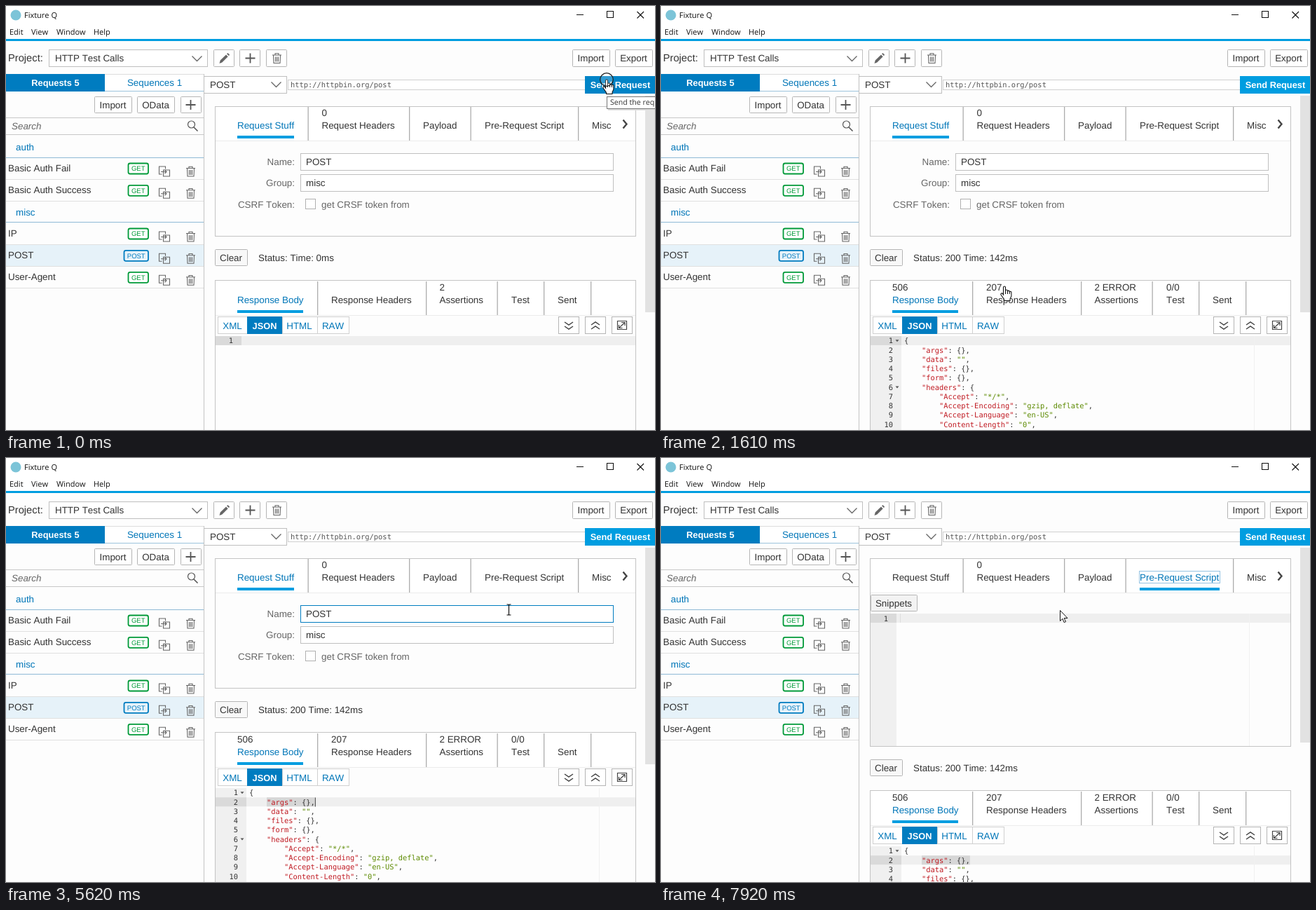
Write an HTML page that moves like this. It is 926x605 px and loops after 8000 ms.

```html
<!DOCTYPE html>
<html lang="en">
<head>
<meta charset="utf-8">
<title>HTTP request tester</title>
<style>
html, body { margin: 0; width: 100%; height: 100%; overflow: hidden; background: #fdfdfd; }
svg { display: block; width: 926px; height: 605px; }
text { font-family: "Liberation Sans", Arial, sans-serif; font-size: 13.4px; font-kerning: none; fill: #333; text-rendering: geometricPrecision; }
.ui { font-family: "Open Sans", sans-serif; font-size: 11px; fill: #111; }
.mono { font-family: "DejaVu Sans Mono", monospace; font-size: 10.4px; }
.b { font-weight: bold; font-size: 12.8px; }
.w { fill: #fff; }
.blue { fill: #0076b8; }
.grey { fill: #666; }
.end { text-anchor: end; }
.mid { text-anchor: middle; }
.key { fill: #c01a22; }
.str { fill: #5c8a00; }
</style>
</head>
<body>
<svg id="stage" viewBox="0 0 926 605"></svg>
<script>
const LOOP = 8000, LINE = 13.25, CHAR = 6.26;
const $ = id => document.getElementById(id);

// Drawing helpers
const text = (x, y, s, cls = '', more = '') => `<text x="${x}" y="${y}" class="${cls}" ${more}>${s}</text>`;
const rect = (x, y, w, h, fill, more = '') => `<rect x="${x}" y="${y}" width="${w}" height="${h}" fill="${fill}" ${more}/>`;
const frame = (x, y, w, h, stroke = '#bfbfbf', fill = '#fff', more = '') =>
  rect(x + .5, y + .5, w, h, fill, `stroke="${stroke}" ${more}`);
const path = (d, stroke = '#555', width = 1.2, more = '') =>
  `<path d="${d}" fill="none" stroke="${stroke}" stroke-width="${width}" ${more}/>`;
const group = (id, body, more = '') => `<g id="${id}" ${more}>${body}</g>`;
const hline = (x, y, w, color = '#dcdcdc') => rect(x, y, w, 1, color);
const button = (x, y, w, h, label = '', fill = '#fff') =>
  frame(x, y, w, h, '#b5b5b5', fill, 'rx="1"') + text(x + w / 2, y + 17, label, 'mid');
const chevron = (x, y) => path(`M${x} ${y}l7 7 7-7`, '#666', 1.3);
const plus = (x, y) => path(`M${x - 7} ${y}h14M${x} ${y - 7}v14`, '#555', 1.8);
const trash = (x, y) =>
  path('M0 3h13M4 3V.7h5V3M1.5 3l.5 11.5h9L11.500 3M4.500 5.500v7M6.500 5.500v7M8.500 5.500v7', '#666', 1.1,
    `transform="translate(${x} ${y})"`);
const copy = (x, y) =>
  path('M4.500 11.500H.5V.5h9V4M6.500 5.500h9v9h-9zM3 8h8M8.500 5.500L11 8l-2.500 2.500', '#666', 1.1,
    `transform="translate(${x} ${y})"`);

function windowBar() {
  const menu = [[5, 'Edit'], [36, 'View'], [72, 'Window'], [125, 'Help']];
  return rect(0, 0, 926, 47, '#fff') +
    '<circle cx="14" cy="13" r="7.500" fill="#7cc4d8"/>' +
    text(26, 17, 'Fixture Q', 'ui') + menu.map(m => text(m[0], 41, m[1], 'ui')).join('') +
    path('M814 12.500h10M857.500 7.500h9v9h-9zM900.500 8l9.500 9.500M910 8l-9.500 9.500', '#111', 1.1) +
    rect(0, 47, 926, 3, '#009de0');
}

function toolbar() {
  return text(3, 79, 'Project:', '', 'style="font-size:14.700px"') +
    frame(61, 62, 226, 24) + text(70, 79, 'HTTP Test Calls') + chevron(265.5, 71.5) +
    button(296, 62, 29, 24) + button(333, 62, 29, 24) + button(371, 62, 29, 24) +
    '<path d="M304.500 82l1.200-4.500 8.300-8 2.700 2.700-8.300 8.300zM315 68.300l1.500-1.300 2.700 2.700-1.400 1.400z" fill="#666"/>' +
    plus(348.5, 74.5) + trash(380, 67) +
    button(808, 62, 53, 24, 'Import') + button(869, 62, 53, 24, 'Export');
}

function listRow(name, y, verb) {
  const post = verb === 'POST', x = post ? 168.5 : 174.5, color = post ? '#007cc0' : '#009a38';
  return text(3, y, name) +
    rect(x, y - 11.5, 203 - x, 15, post ? '#e6f2f9' : '#fff', `stroke="${color}" stroke-width="1.800" rx="2.500"`) +
    text((x + 203) / 2, y - .6, verb, 'mid', `style="font-size:9.500px;fill:${color}"`) +
    copy(218, y - 7.5) + trash(257, y - 7.5) + hline(0, Math.round(y + 11), 282, '#e0e0e0');
}

function sidebar() {
  const groupRow = (name, y, lineY) => text(14, y, name, 'blue') + hline(0, lineY, 282, '#8fbad6');
  return rect(141, 97, 141, 25, '#fff') + hline(141, 97, 141) + hline(0, 121, 282, '#9cc3dc') +
    rect(0, 97, 141, 25, '#007cc0') + text(70.5, 114, 'Requests 5', 'b w mid') +
    text(212, 114, 'Sequences 1', 'blue mid') +
    button(126, 129, 53, 23, 'Import') + button(187, 129, 53, 23, 'OData') + button(249, 129, 29, 23) +
    plus(263.5, 141) +
    hline(0, 159, 282, '#c8c8c8') + hline(0, 183, 282, '#c8c8c8') + text(8, 176, 'Search', 'grey', 'font-style="italic"') +
    '<circle cx="264.500" cy="169" r="5" fill="none" stroke="#555" stroke-width="1.200"/>' + path('M268 173l5.500 5.500', '#555', 1.6) +
    groupRow('auth', 206, 216) + listRow('Basic Auth Fail', 236, 'GET') + listRow('Basic Auth Success', 267.3, 'GET') +
    groupRow('misc', 299, 308) + rect(0, 340, 282, 31, '#e6f2f9') +
    listRow('IP', 329, 'GET') + listRow('POST', 360.3, 'POST') + listRow('User-Agent', 391.3, 'GET') +
    rect(282, 97, 1, 508, '#c4c4c4');
}

function urlBar() {
  return frame(402, 105, 425, 14, '#d0d0d0') + text(406, 116, 'http://httpbin.org/post', 'mono', 'style="fill:#555"') +
    frame(282, 100, 118, 24) + text(291, 117, 'POST') + chevron(378.5, 108.5) +
    rect(826, 100, 100, 25, '#009de0', 'id="send"') + text(876.5, 117, 'Send Request', 'b w mid') +
    rect(912, 128, 14, 309, '#e2e2e2', 'id="thumb"');
}

const tabs = (y, list, splits) => hline(299, y + 48, 599, '#ececec') +
  list.map(([x, name, id = '', cls = '']) => text(x, y + 31, name, cls, id && `id="${id}"`)).join('') +
  splits.map(x => rect(x, y, 1.3, 48, '#adadad')).join('');

function requestPanel() {
  const field = (y, label, value, id) => text(412, y + 17, label, 'grey end') +
    frame(420, y, 446, 24, '#bfbfbf', '#fff', id ? `id="${id}"` : '') + text(428, y + 17, value);
  return frame(298, 143, 600, 185, '#c4c4c4', '#fdfdfd', 'id="box"') +
    rect(299, 144, 599, 48, '#fff') +
    tabs(144, [[330, 'Request Stuff', 'tabA', 'blue'], [450.5, 'Request Headers'], [595, 'Payload'],
      [683, 'Pre-Request Script', 'tabB'], [836, 'Misc']], [430.5, 575, 662.5, 816]) +
    text(450.5, 157, '0') + path('M880.500 162.500l5 6-5 6', '#444', 2.4) +
    rect(330, 185, 81, 4, '#009de0', 'id="bar"') +
    rect(682.5, 161.5, 115, 17, 'none', 'id="focus" stroke="#2a86c4" stroke-dasharray="1 1"') +
    group('form',
      field(210, 'Name:', 'POST', 'name') + field(240, 'Group:', 'misc') +
      text(412, 287.5, 'CSRF Token:', 'grey end') + frame(427, 275, 14, 14, '#b0b0b0') +
      text(450, 287.5, 'get CRSF token from', 'grey')) +
    group('script',
      button(299, 195, 66, 23, 'Snippets', '#f3f3f3') + rect(299, 222, 37, 189, '#f0f0f0') +
      rect(299, 222, 37, 13, '#dadada') + rect(336, 222, 562, 13, '#efefef') +
      rect(839, 222, 1, 189, '#f2f2f2') + rect(341, 222, 1, 13, '#ddd') + text(324, 232.5, '1', 'mono end'));
}

const body = ['{', '    "args": {},', '    "data": "",', '    "files": {},', '    "form": {},', '    "headers": {',
  '        "Accept": "*/*",', '        "Accept-Encoding": "gzip, deflate",',
  '        "Accept-Language": "en-US",', '        "Content-Length": "0",'];

function codeLine(src, i) {
  const y = 481.3 + LINE * i, code = src.trimStart();
  const marked = code.replace(/"[^"]*"(:?)/g, (s, colon) =>
    `<tspan class="${colon ? 'key' : 'str'}">${colon ? s.slice(0, -1) : s}</tspan>${colon}`);
  const fold = code.endsWith('{') ? `<path d="M334.500 ${y - 5}h5l-2.500 3z" fill="#555"/>` : '';
  return text(331, y, i + 1, 'mono end') + fold + text(347 + CHAR * (src.length - code.length), y, marked, 'mono');
}

function responsePanel() {
  const counts = [[330, '506'], [464, '207'], [618.5, '2 ERROR'], [721, '0/0']];
  const formats = [[323, 'XML'], [418.5, 'HTML'], [466.5, 'RAW']];
  const tool = (x, d, w = 1.5) => frame(x, 443, 29, 24, '#b5b5b5') + path(d, '#444', w);
  return button(298, 347, 46, 23, 'Clear', '#f8f8f8') + text(360, 364, '', '', 'id="status"') +
    frame(298, 391, 600, 400, '#c4c4c4', '#fdfdfd') + rect(299, 392, 599, 49, '#fff') +
    tabs(393, [[330, 'Response Body', '', 'blue'], [464, 'Response Headers'], [618.5, 'Assertions'],
      [721, 'Test'], [787, 'Sent']], [444, 599, 700.5, 767, 834]) +
    rect(330, 434, 94, 4, '#009de0') +
    group('before', text(618.5, 406, '2')) +
    group('counts', counts.map(c => text(c[0], 406, c[1])).join('')) +
    frame(302, 443, 187, 24, '#d0d0d0') + rect(394, 443, 1, 25, '#d0d0d0') + rect(444, 443, 1, 25, '#d0d0d0') +
    rect(344, 443, 50, 25, '#007cc0') + text(369, 460.5, 'JSON', 'b w mid') +
    formats.map(f => text(f[0], 460.5, f[1], 'blue mid')).join('') +
    tool(788, 'M797 451l6 4 6-4M797 457l6 4 6-4') + tool(826, 'M835 455l6-4 6 4M835 461l6-4 6 4') +
    tool(864, 'M872.500 449.500h13v12h-13zM875 459l7.500-7M878 451.500h5v4.500M874.500 455v4.500h5', 1.2) +
    rect(299, 471, 44, 140, '#f0f0f0', 'id="gutter"') +
    group('active', rect(299, 471, 599, 13, '#efefef') + rect(299, 471, 37, 13, '#dadada', 'id="activeGutter"')) +
    group('empty', text(324, 481.3, '1', 'mono end')) +
    group('json', rect(846, 471, 1, 134, '#f0f0f0') + rect(372, 484.3, 0, 13, '#d6d6d6', 'id="selection"') +
      body.map(codeLine).join('') + rect(441, 484.5, 1, 13, '#444', 'id="caret"'));
}

const tooltip = () => rect(859, 132, 70, 17, '#ddd') + frame(857, 129, 90, 17, '#777') +
  text(862, 141, 'Send the request', 'ui', 'style="font-size:10.600px;fill:#333"');

const pointers = () =>
  group('hand', '<path d="M-1.500 12V1.500a1.500 1.500 0 0 1 3 0V6.500a1.500 1.500 0 0 1 3 0V7.500a1.400 1.400 0 0 1 2.800 0V8.500a1.300 1.300 0 0 1 2.600 0V14l-1.900 4v2.500H-.5V18.500L-5 12a1.500 1.500 0 0 1 2-2z" fill="#fff" stroke="#111" stroke-width="1.100"/>' +
    path('M1.500 6v5M4.500 7v4M7.300 8v3', '#111', 1)) +
  group('beam', path('M-3-7.500h2.200L0-6.800l.8-.7H3M0-7V7M-3 7.500h2.200L0 6.800l.8.7H3', '#111', 1.2)) +
  group('arrow', '<path d="M.5.5V15.500l3.400-3.200 2.300 5.300 2.300-1-2.300-5.100h4.800z" fill="#fff" stroke="#111"/>') +
  '<circle id="press" r="9.300" fill="#fff" fill-opacity=".2" stroke="#222" stroke-width="1.300"/>';

$('stage').innerHTML = rect(0, 0, 926, 605, '#fdfdfd') + windowBar() + toolbar() + sidebar() + urlBar() +
  requestPanel() + group('response', responsePanel()) + group('tip', tooltip()) + group('pointer', pointers());

// Pointer moves: start, step length, shape per step (h hand, a arrow, t text beam), positions
const moves = [
  [0, 1, 'h', [857, 105]],
  [740, 120, 'hah', [846, 112, 814, 138, 777, 171]],
  [1110, 130, 'taahht', [700, 225, 607, 292, 535, 355, 490, 400, 425, 455, 379, 501]],
  [1880, 120, 'ttt', [377, 499, 374, 496, 372.5, 495]],
  [2430, 150, 'tttttt', [372.5, 495, 380, 494, 400, 492, 425, 490, 445, 489, 454, 488]],
  [3490, 130, 'ttttt', [454, 488, 457, 492, 464, 504, 472, 515, 475.5, 520]],
  [4960, 132, 'tthatt', [478, 511, 495, 480, 535, 398, 676, 322, 713, 230, 717.5, 216.5]],
  [5770, 150, 'ahh', [721, 196, 723, 171, 723, 167]],
  [7460, 153, 'haaa', [700, 177, 640, 199, 590, 213, 569, 217]]
];
const shapes = { h: 'hand', a: 'arrow', t: 'beam' };

function pointerAt(t) {
  const [start, step, kinds, pts] = moves.filter(m => m[0] <= t).pop();
  const i = Math.min(kinds.length - 1, Math.floor((t - start) / step));
  return { kind: kinds[i], x: pts[2 * i], y: pts[2 * i + 1] };
}

const show = (id, on) => $(id).style.display = on ? '' : 'none';
const set = (id, attrs) => { for (const k in attrs) $(id).setAttribute(k, attrs[k]); };

function render(t) {
  const within = (a, b) => t >= a && t < b;
  const loaded = t >= 310, picked = t >= 2430, focused = t >= 6630, scripted = t >= 6930;
  const p = pointerAt(t);

  set('pointer', { transform: `translate(${p.x} ${p.y})` });
  for (const k in shapes) show(shapes[k], p.kind === k);
  show('press', t < 160 || within(2430, 3490) || within(6630, 6780));
  show('tip', t < 460);
  set('send', { fill: t < 860 ? '#0084c7' : '#009de0' });

  set('name', { stroke: within(1110, 1240) || within(5488, 5770) ? '#007cc0' : '#bfbfbf' });
  show('focus', focused);
  show('form', !scripted);
  show('script', scripted);
  set('box', { height: scripted ? 268 : 185 });
  set('bar', scripted ? { x: 683, width: 114 } : { x: 330, width: 81 });
  set('tabA', { class: scripted ? '' : 'blue' });
  set('tabB', { class: scripted ? 'blue' : '' });
  set('thumb', { height: scripted ? 278 : 309 });
  set('response', { transform: `translate(0 ${scripted ? 83 : 0})` });

  $('status').textContent = loaded ? 'Status: 200 Time: 142ms' : 'Status: Time: 0ms';
  show('before', !loaded);
  show('counts', loaded);
  show('empty', !loaded);
  show('json', loaded);
  show('gutter', loaded);
  set('activeGutter', { width: loaded ? 44 : 37 });
  set('active', { transform: `translate(0 ${picked ? LINE : 0})` });

  const dragX = within(2430, 3490) ? p.x : 454;
  const chars = picked ? Math.max(0, Math.min(11, Math.round((dragX - 372) / CHAR))) : 0;
  set('selection', { width: chars * CHAR });
  set('caret', { x: 372 + chars * CHAR });
  show('caret', picked && !focused);
}

const begin = performance.now();
function tick() {
  render((performance.now() - begin) % LOOP);
  requestAnimationFrame(tick);
}
tick();
</script>
</body>
</html>
```
